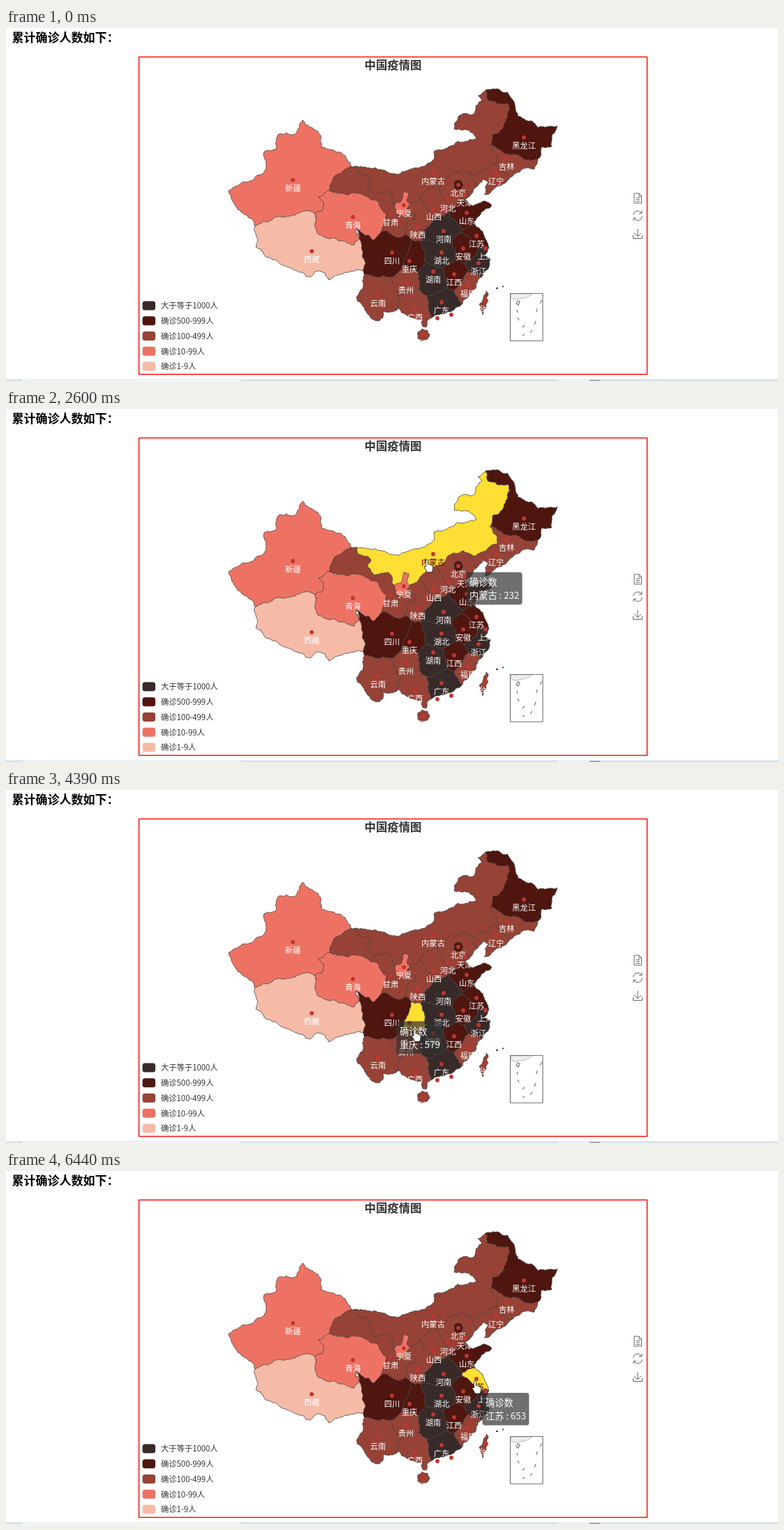
Write an HTML page with a canvas that moves like this. It is 1106 px wide and 506 px high and loops after 6.52 s.

```html
<!DOCTYPE html>
<html lang="zh-CN">
<head>
<meta charset="utf-8">
<style>
html, body { margin: 0; width: 100%; height: 100%; overflow: hidden; background: #fff; }
canvas { display: block; }
</style>
</head>
<body>
<canvas id="stage" width="1106" height="506"></canvas>
<script>
const ctx = document.getElementById('stage').getContext('2d');
const FONT = '"Noto Sans CJK SC", "Noto Sans", sans-serif';
const LEVELS = [
  [1000, '#372a28', '大于等于1000人'],
  [500, '#4e160f', '确诊500-999人'],
  [100, '#974236', '确诊100-499人'],
  [10, '#ee7263', '确诊10-99人'],
  [1, '#f5bba7', '确诊1-9人']
];

// ---- Map geometry ----
const noise = (x, y) => {
  const v = Math.sin(x * 12.9898 + y * 78.233) * 43758.5453;
  return v - Math.floor(v) - 0.5;
};

// Midpoint displacement, equal in both directions so that neighbours share a border.
function ragged(path, ax, ay, bx, by) {
  const len = Math.hypot(bx - ax, by - ay);
  if (len < 3.5) return path.lineTo(bx, by);
  const sx = ax + bx, sy = ay + by, sway = Math.min(len, 16) * 0.32;
  const mx = sx / 2 + noise(sx, sy) * sway;
  const my = sy / 2 + noise(sy, sx + 7) * sway;
  ragged(path, ax, ay, mx, my);
  ragged(path, mx, my, bx, by);
}

function closed(points) {
  const path = new Path2D();
  path.moveTo(...points[0]);
  points.forEach((p, i) => ragged(path, ...p, ...points[(i + 1) % points.length]));
  path.closePath();
  return path;
}

const outline = str => closed(str.split(' ').map(p => p.split(',').map(Number)));

// Provinces in painting order; later ones cover the inner edges of earlier ones.
const provinces = [];
function add(name, cases, x, y, shape) {
  const color = LEVELS.find(l => cases >= l[0])[1];
  provinces.push({ name, cases, x, y, color, ...shape });
}
const region = (name, cases, x, y, str) => add(name, cases, x, y, { path: outline(str) });

// A compact province: its territory follows from a centre and a reach.
const cell = (name, cases, x, y, reach, dx = 0, dy = 0) =>
  add(name, cases, x, y, { reach, cx: x + dx, cy: y + dy });

function spot(name, cases, x, y, radius) {
  const corners = Array.from({ length: 7 }, (_, i) =>
    [x + radius * Math.cos(i * 0.9), y + radius * Math.sin(i * 0.9)]);
  add(name, cases, x, y, { path: closed(corners) });
}

region('内蒙古', 232, 612, 208, '494,199 522,201 560,210 580,202 600,198 613,188 614,176 633,171 647,162 674,158 663,146 642,145 650,125 669,124 682,103 676,97 687,89 722,105 720,140 708,190 690,208 640,222 600,245 580,262 555,262 510,235');
region('新疆', 76, 411, 218, '425,132 447,148 452,171 472,177 486,183 494,199 480,225 465,250 450,275 420,275 375,283 357,284 351,273 329,255 319,233 337,222 356,215 370,206 370,177 387,173 391,152 411,153');
region('西藏', 1, 438, 320, '443,266 424,263 395,271 369,277 357,284 358,314 376,329 400,341 421,350 436,357 442,350 457,351 462,361 486,350 512,348 525,330 510,295 450,285');

const eastern = outline('693,168 704,184 704,193 689,201 669,211 655,203 632,212 628,220 605,231 590,247 579,252 560,285 530,290 502,288 510,312 515,338 513,355 511,374 503,391 515,405 524,417 535,420 541,406 552,407 563,402 573,411 585,416 596,418 597,428 602,429 603,420 626,410 650,399 661,387 672,374 677,360 690,346 694,330 685,325 692,315 689,306 679,288 670,278 680,267 696,254 682,249 669,255 659,244 674,228 683,217 692,221 685,239 709,226 729,209 750,201 757,202 762,190 755,170 725,165');
cell('吉林', 102, 717, 187, 23);
cell('辽宁', 140, 702, 208, 20, -6, 4);
cell('河北', 327, 633, 247, 22, 12, -10);
cell('山西', 198, 613, 259, 20, 0, -8);
cell('陕西', 256, 590, 285, 24, 0, -15);
cell('山东', 784, 660, 265, 20);
cell('河南', 1276, 627, 291, 22);
cell('江苏', 653, 674, 298, 16);
cell('安徽', 991, 655, 316, 18);
cell('湖北', 68135, 624, 322, 21);
cell('浙江', 1264, 677, 337, 16);
cell('江西', 937, 642, 353, 19);
cell('湖南', 1019, 612, 349, 22, 0, 13);
cell('四川', 595, 553, 322, 34, -10);
cell('重庆', 579, 578, 334, 18);
cell('贵州', 147, 573, 364, 20);
cell('云南', 184, 533, 383, 30);
cell('福建', 353, 662, 369, 17);
cell('广西', 254, 586, 403, 23, 0, -4);
cell('广东', 1571, 624, 393, 21);

region('甘肃', 139, 551, 267, '493,199 503,199 504,208 523,216 517,226 527,238 546,234 553,241 553,250 560,258 580,262 588,267 586,274 574,279 573,291 570,298 557,299 545,291 537,293 530,280 515,245 480,240 463,233 467,221 470,213');
region('青海', 18, 497, 271, '462,233 487,239 512,238 533,249 545,268 540,285 537,293 526,304 514,297 502,288 506,302 499,311 482,305 460,301 448,296 443,286 443,266 453,262 455,249 447,242');
region('宁夏', 75, 570, 254, '570,234 577,236 575,249 579,253 573,262 571,273 558,263 558,252 566,249');
region('黑龙江', 527, 742, 157, '687,89 703,87 719,92 729,110 733,126 752,133 762,143 790,140 783,152 782,170 767,171 762,188 740,186 708,175 695,167 697,153 708,147 716,134 722,117 719,108 703,108 691,104');
region('台湾', 393, 688, 391, '688,377 691,381 689,392 683,411 678,396');
spot('北京', 588, 648, 225, 7);
spot('天津', 178, 657, 239, 6);
spot('上海', 628, 687, 316, 4);
spot('海南', 168, 598, 440, 9);
add('香港', 1013, 638, 411);
add('澳门', 44, 618, 416);

// Power diagram cell: clip a large box against every neighbour.
function territory(own, all) {
  const far = (p, s) => (p[0] - s.cx) ** 2 + (p[1] - s.cy) ** 2 - s.reach ** 2;
  let poly = [[480, 140], [790, 140], [790, 450], [480, 450]];
  for (const other of all) {
    if (other === own) continue;
    const side = p => far(p, other) - far(p, own);
    poly = poly.flatMap((p, i) => {
      const q = poly[(i + 1) % poly.length], u = side(p), v = side(q), k = u / (u - v);
      const kept = u >= 0 ? [p] : [];
      return u * v < 0 ? [...kept, p.map((c, j) => c + (q[j] - c) * k)] : kept;
    });
  }
  return closed(poly.map(p => p.map(Math.round)));
}
const cells = provinces.filter(p => p.reach);
cells.forEach(p => p.path = territory(p, cells));

// ---- Pointer ----
// Start of each group of nine equally long pointer steps.
const GROUPS = [130, 820, 1510, 2210, 2910, 3630, 4330, 5030, 5740, 6440, 7140];
const LOOP = 6520;
const TOOLTIP_LAG = 150;
// time, x, y
const TRACK = [
  [130, 945, 490], [500, 600, 340], [670, 560, 307], [820, 561, 287], [1430, 551, 258],
  [1820, 600, 239], [1970, 623, 236], [2120, 630, 230], [2450, 631, 211], [2600, 603, 216],
  [3480, 472, 214], [3630, 466, 209], [4100, 478, 275], [4250, 577, 338], [4500, 604, 352],
  [5040, 589, 377], [5190, 582, 374], [5660, 645, 345], [6290, 654, 295], [6440, 672, 301]
];
const HAND = new Path2D('M-1.5 1Q0-1.5 1.5 1V7Q3 5.5 4 7.5Q5.5 6.5 6.5 8.5Q8.5 8 8.5 10V13Q8 16 7 18H0Q-1 15-4 11Q-4.5 8.5-1.5 10Z');
const ARROW = new Path2D('M0 0V14L3.3 11L5.5 16L7.5 15L5.4 10.2H10Z');

function stepped(t) {
  const g = GROUPS.findLastIndex(start => t >= start);
  const step = (GROUPS[g + 1] - GROUPS[g]) / 9;
  return GROUPS[g] + Math.floor((t - GROUPS[g]) / step + 0.1) * step;
}

function pointer(t) {
  const next = TRACK.findIndex(key => key[0] > t);
  if (next < 1) return TRACK.at(next).slice(1);
  const [ta, ax, ay] = TRACK[next - 1], [tb, bx, by] = TRACK[next];
  const k = (t - ta) / (tb - ta);
  return [ax + (bx - ax) * k, ay + (by - ay) * k];
}

// ---- Drawing ----
function text(str, x, y, size, color, align = 'left', weight = 400) {
  ctx.font = `${weight} ${size}px ${FONT}`;
  ctx.textAlign = align;
  ctx.textBaseline = 'middle';
  ctx.fillStyle = color;
  ctx.fillText(str, x, y);
}

function shape(path, fill, stroke, width = 1) {
  ctx.lineWidth = width;
  ctx.strokeStyle = stroke;
  if (fill) {
    ctx.fillStyle = fill;
    ctx.fill(path);
  }
  ctx.stroke(path);
}

function box(x, y, w, h, color, radius = 0) {
  ctx.fillStyle = color;
  ctx.beginPath();
  ctx.roundRect(x, y, w, h, radius);
  ctx.fill();
}

const line = (d, color, width) => shape(new Path2D(d), null, color, width);

function drawPage() {
  box(0, 0, 1106, 506, '#fff');
  text('累计确诊人数如下：', 8.5, 14, 17, '#000', 'left', 700);
  ctx.lineWidth = 1.4;
  ctx.strokeStyle = '#f00';
  ctx.strokeRect(190.5, 41.5, 728, 455);
  text('中国疫情图', 554.5, 53, 16.4, '#333', 'center', 700);
  LEVELS.forEach(([, color, caption], i) => {
    const y = 398 + i * 21.75;
    box(195.5, y - 6.5, 18.5, 13, color, 3.5);
    text(caption, 222, y, 11.3, '#333');
  });

  line('M900 237H907L910.5 240.5V251H900ZM907 237V241H910M902.5 243H908M902.5 245.7H908M902.5 248.4H908', '#666');
  line('M898.5 268A6.6 6.6 0 0 1 910.5 265M911.5 270A6.6 6.6 0 0 1 899.5 273M911 261.5V265.5H907M899 276.5V272.5H903', '#666');
  line('M905 288V299M900 294L905 299L910 294M898.5 297V301.5H911.5V297', '#666');

  shape(new Path2D('M723 386Q728 391 736 388Q748 387 754 381H723Z'), '#eee', '#aaa', 0.8);
  line('M722.5 380.5H769V448.5H722.5Z', '#777', 1.2);
  line('M731 395L733 391L736 392L734 397ZM732 404L733 408M733 415L735 419M740 429L743 426M740 441L743 439M751 437L754 433M757 425L759 420M760 407L761 402M765 395L768 390', '#777', 1.2);
  box(702, 372, 3, 2, '#633');
  box(711, 369.5, 2, 2, '#633');

  box(0, 503.5, 1106, 2.5, '#d5dfe8');
  box(24, 504.5, 312, 1.5, '#fafafa');
  box(790, 504, 46, 2, '#eef2f5');
  box(836, 504.5, 15, 1.5, '#a29498');
}

function drawMap(hovered) {
  for (const p of provinces) {
    if (!p.path) continue;
    ctx.save();
    if (p.reach) ctx.clip(eastern);
    shape(p.path, p === hovered ? '#ffdf33' : p.color, '#444', 0.8);
    ctx.restore();
    if (p === cells.at(-1)) shape(eastern, null, '#444', 0.8);
  }
  for (const p of provinces) {
    text(p.name, p.x, p.y + 11.7, 11.3, p === hovered ? '#640000' : '#fff', 'center');
    box(p.x - 2.9, p.y - 2.9, 5.8, 5.8, '#c23531', 2.9);
  }
}

function drawTooltip(p, x, y) {
  const value = `${p.name} : ${p.cases}`;
  ctx.font = `400 13.2px ${FONT}`;
  box(x, y, ctx.measureText(value).width + 9, 46.5, 'rgba(50,50,50,.7)', 3.8);
  text('确诊数', x + 4.6, y + 14.3, 13.2, '#fff');
  text(value, x + 4.6, y + 33, 13.2, '#fff');
}

function provinceAt(x, y) {
  const inside = path => ctx.isPointInPath(path, x, y);
  return provinces.findLast(p => p.path && inside(p.path) && (!p.reach || inside(eastern)));
}

function draw(t) {
  drawPage();
  if (t < GROUPS[0]) return drawMap();
  const time = stepped(t);
  const [x, y] = pointer(time);
  const hovered = provinceAt(x, y);
  drawMap(hovered);
  if (hovered) {
    const [tipX, tipY] = pointer(time - TOOLTIP_LAG);
    drawTooltip(hovered, tipX + 28.5, tipY + 23);
  }
  ctx.save();
  ctx.translate(x, y);
  shape(hovered ? HAND : ARROW, '#fff', '#222', 0.9);
  ctx.restore();
}

const begin = performance.now();
function tick() {
  draw((performance.now() - begin) % LOOP);
  requestAnimationFrame(tick);
}
tick();
</script>
</body>
</html>
```
